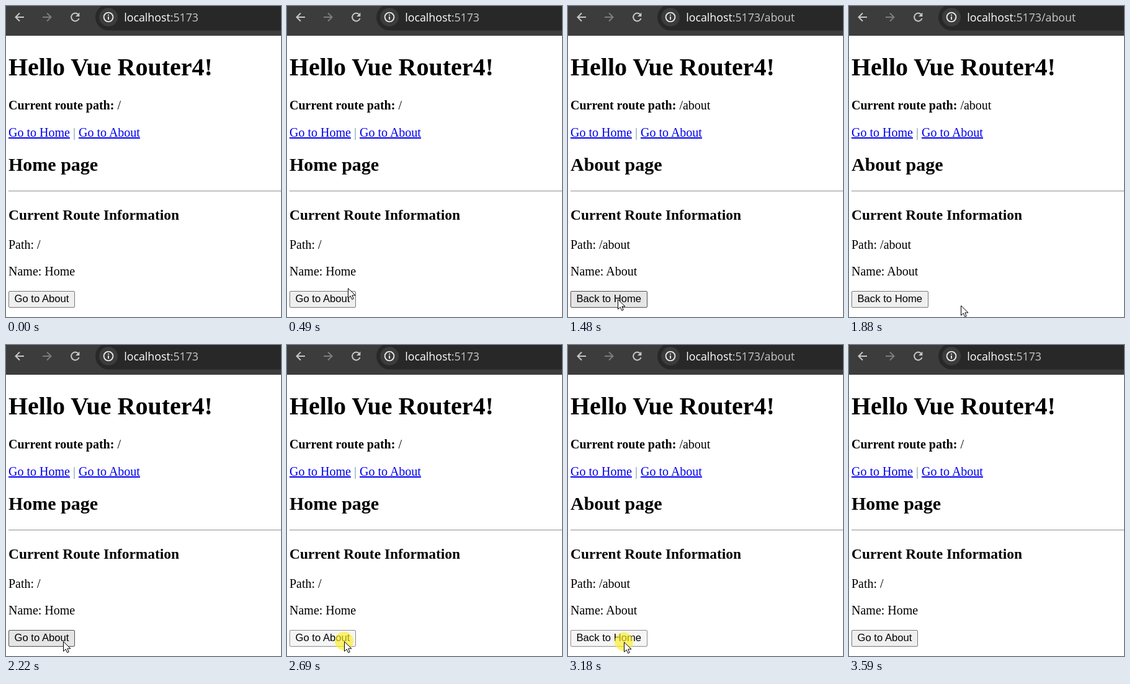
An HTML page for the animation above (4340 ms loop, 443 by 502 pixels).

```html
<!DOCTYPE html>
<html lang="en">
<head>
<meta charset="utf-8">
<title>Vue Router demo</title>
<style>
  html, body { margin: 0; width: 100%; height: 100%; overflow: hidden; background: #fff; }
  svg { display: block; width: 100vw; height: 100vh; }
  text { font: 20px "Liberation Serif", "Times New Roman", serif; white-space: pre; }
  .bold { font-weight: bold; }
  .link { fill: #00e; text-decoration: underline; }
  text.url { font: 17.75px "Open Sans", "Noto Sans", sans-serif; fill: #c7c7c7; }
  text.label { font: 16.67px "Liberation Sans", Arial, sans-serif; }
  .icon { fill: none; stroke: #c7c7c7; stroke-width: 2; }
  .info { fill: none; stroke: #e8e8e8; stroke-width: 1.9; }
</style>
</head>
<body>
<svg viewBox="0 0 443 502">
  <rect width="443" height="502" fill="#fff"/>

  <!-- Browser bar -->
  <rect width="443" height="48" fill="#3c3c3c"/>
  <rect x="144" y="-3" width="340" height="42.5" rx="21.2" fill="#282828"/>
  <path class="icon" d="M29 18H16M22 11.5L15.5 18L22 24.5"/>
  <path class="icon" style="stroke:#7d7d7d" d="M59 18H72M66 11.5L72.5 18L66 24.5"/>
  <path class="icon" d="M117.6 20A6.4 6.4 0 1 1 116 13.4"/>
  <path d="M118.4 10.6V17H112Z" fill="#c7c7c7"/>
  <circle cx="165" cy="18" r="15" fill="#3c3c3c"/>
  <circle class="info" cx="165" cy="18" r="7.4"/>
  <path class="info" d="M165 17V22M165 13.8V15.6"/>
  <text class="url" x="190.3" y="25"><tspan fill="#fff">localhost</tspan>:5173<tspan id="url"></tspan></text>

  <!-- Page -->
  <text class="bold" x="4" y="112" style="font-size:40px">Hello Vue Router4!</text>
  <text x="4" y="167"><tspan class="bold">Current route path:</tspan> <tspan id="route"></tspan></text>
  <text class="link" x="4" y="211">Go to Home</text>
  <text x="107.9" y="211" fill="#5f8f9f">|</text>
  <text class="link" x="117" y="211">Go to About</text>
  <text id="heading" class="bold" x="4" y="266" style="font-size:30px"></text>
  <path d="M4 298.5H443" stroke="#9a9a9a"/>
  <path d="M4 299.5H443" stroke="#eee"/>
  <text class="bold" x="4" y="345" style="font-size:23.4px">Current Route Information</text>
  <text id="path" x="4" y="392"></text>
  <text id="name" x="4" y="435"></text>
  <rect id="button" x="4.5" y="460.5" height="26" rx="1.5"/>
  <text id="label" class="label" x="13.5" y="478"></text>

  <!-- Pointer -->
  <g id="pointer">
    <circle id="press" r="15" fill="#fe2" opacity=".65"/>
    <path d="M.5 .8V16.5L4.2 13L6.7 18.6L9.2 17.5L6.8 12H12Z" fill="#fff" stroke="#000"/>
  </g>
</svg>
<script>
const LOOP = 4340;
const STEP = 1000 / 15; // the pointer is redrawn 15 times a second
const OFFSET = 20;
const $ = id => document.getElementById(id);

const ENTER = { time: 220, x: 362, y: 351 };
const EXIT_TIME = 3590;
const MOVES = [
  { start: 220, end: 490, x: 98, y: 455 },   // in from the right
  { start: 490, end: 690, x: 71, y: 472 },   // settle on the button
  { start: 1410, end: 1680, x: 188, y: 482 }, // wander off
  { start: 1810, end: 1880, x: 158, y: 486 },
  { start: 1880, end: 2080, x: 92, y: 478 }, // back to the button
  { start: 2890, end: 2960, x: 90, y: 479 },
  { start: 3170, end: 3590, x: 408, y: 488 } // out to the right
];
const PRESSES = [
  { down: 1090, up: 1220 }, { down: 2080, up: 2220 },
  { down: 2690, up: 2760 }, { down: 3110, up: 3240 }
];
const BUTTON = {
  normal: ["#efefef", "#767676"],
  hover: ["#e5e5e5", "#4f4f4f"],
  active: ["#f5f5f5", "#8d8d8d"]
};
const PAGES = [
  { name: "Home", path: "/", url: "", label: "Go to About", width: 106 },
  { name: "About", path: "/about", url: "/about", label: "Back to Home", width: 123 }
];

const easeOut = p => 1 - (1 - p) ** 2;

function pointerAt(t) {
  const held = Math.floor((t - OFFSET) / STEP) * STEP + OFFSET;
  let { x, y } = ENTER;
  for (const move of MOVES) {
    const p = (held - move.start) / (move.end - move.start);
    const k = easeOut(Math.min(1, Math.max(0, p)));
    x += (move.x - x) * k;
    y += (move.y - y) * k;
  }
  return { x: Math.round(x), y: Math.round(y) };
}

function draw(t) {
  // Every release of the button switches the page.
  const page = PAGES[PRESSES.filter(({ up }) => t >= up).length % 2];
  const pressed = PRESSES.some(({ down, up }) => t >= down && t < up);
  const visible = t >= ENTER.time && t < EXIT_TIME;
  const { x, y } = pointerAt(t);
  const over = visible && x <= 5 + page.width && y >= 460 && y < 487;
  const [fill, stroke] = BUTTON[pressed ? "active" : over ? "hover" : "normal"];

  $("url").textContent = page.url;
  $("route").textContent = page.path;
  $("heading").textContent = page.name + " page";
  $("path").textContent = "Path: " + page.path;
  $("name").textContent = "Name: " + page.name;
  $("label").textContent = page.label;
  $("button").setAttribute("width", page.width);
  $("button").setAttribute("fill", fill);
  $("button").setAttribute("stroke", stroke);

  $("pointer").style.display = visible ? "" : "none";
  $("pointer").setAttribute("transform", `translate(${x} ${y})`);
  $("press").style.display = pressed ? "" : "none";
}

const startTime = performance.now();
function tick() {
  draw((performance.now() - startTime) % LOOP);
  requestAnimationFrame(tick);
}
tick();
</script>
</body>
</html>
```
